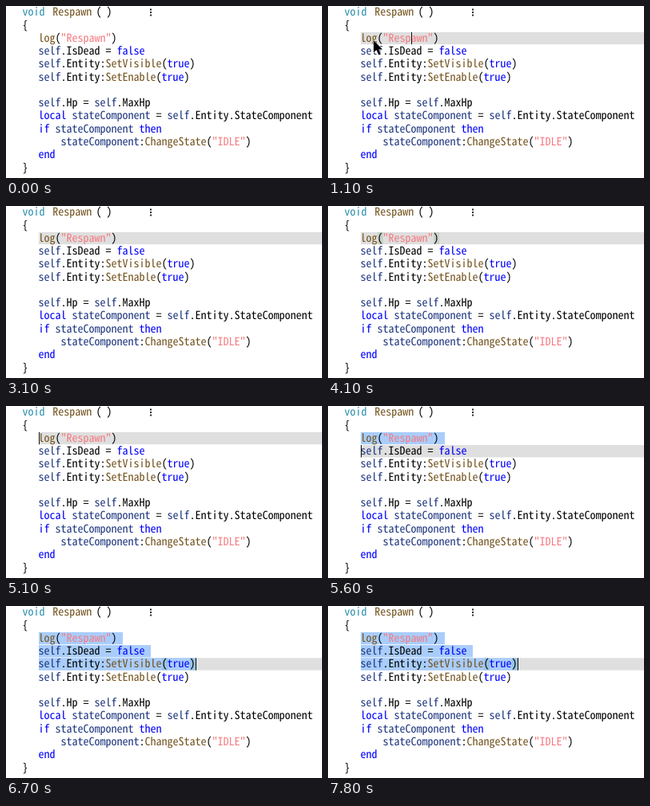
An HTML page that plays this animation: 395x216 px, repeating every 8000 ms.

```html
<!DOCTYPE html>
<html lang="en">
<head>
<meta charset="utf-8">
<title>Code editor</title>
<style>
  html, body { margin: 0; width: 100%; height: 100%; overflow: hidden; background: #fff; }
  svg { display: block; width: 395px; height: 216px; }
  text { white-space: pre; fill: #000; font-variant-ligatures: none; text-rendering: geometricPrecision; }
  .type { fill: #2b91af; }
  .func { fill: #74531f; }
  .word { fill: #0000ff; }
  .name { fill: #1f377f; }
  .str { fill: #f47c82; }
  .bold { font-weight: 700; font-size: 1.07em; }
  .hint path { fill: #fffecb; stroke: #d8d7b4; filter: drop-shadow(1px 1.5px 1px rgba(0, 0, 0, .45)); }
</style>
</head>
<body>
<svg id="stage" viewBox="0 0 395 216"></svg>
<script>
const LOOP = 8000, CELL = 7, LEFT = 41, TOP = 32.8, ROW = 16.25, BAR = 15.4;
const FONT = '"Noto Sans Mono CJK KR", "Noto Sans Mono CJK JP", "Noto Sans Mono", "DejaVu Sans Mono", monospace';
const stage = document.getElementById('stage');

function add(tag, attrs, parent = stage) {
  const node = document.createElementNS('http://www.w3.org/2000/svg', tag);
  for (const key in attrs) node.setAttribute(key, attrs[key]);
  parent.appendChild(node);
  return node;
}

const colX = col => LEFT + col * CELL;
const rowY = row => TOP + row * ROW;
const show = (node, on) => node.setAttribute('visibility', on ? 'visible' : 'hidden');

// One character fills one cell, whichever monospace face is found.
const pen = document.createElement('canvas').getContext('2d');
pen.font = '100px ' + FONT;
stage.style.fontFamily = FONT;
stage.style.fontSize = CELL * 100 / pen.measureText('0').width + 'px';

function cells(row, from, to, fill, parent) {
  return add('rect', { x: colX(from), y: rowY(row), width: (to - from) * CELL, height: BAR, fill }, parent);
}

// Parts are written as "class|text"; a plain part has no class.
function line(x, y, parts, parent) {
  const text = add('text', { x: x - 0.5, y }, parent);
  for (const part of parts) {
    const cut = part.indexOf('|');
    const span = add('tspan', cut > 0 ? { class: part.slice(0, cut) } : {}, text);
    span.textContent = part.slice(cut + 1);
  }
}

// Backgrounds
const activeLine = add('rect', { x: LEFT, width: 395 - LEFT, height: BAR, fill: '#dfdfdf' });
const SELECT = '#a9cdfb';
const selected = [
  cells(0, 0, 15, SELECT),
  cells(1, 0, 20, SELECT),
  cells(2, 0, 28, SELECT)
];
const matches = add('g', {});
[[1, 0], [2, 0], [3, 0], [5, 0], [5, 10], [6, 23]].forEach(([row, col]) =>
  cells(row, col, col + 4, 'rgba(250,160,80,.3)', matches));
const brackets = [[0, 3, 13], [2, 22, 27]].map(([row, open, close]) => {
  const group = add('g', {});
  for (const col of [open, close]) cells(row, col, col + 1, 'rgba(0,100,0,.1)', group);
  return group;
});

// Code
line(21, 12, ['type|void']);
line(58.8, 12, ['func|Respawn']);
line(113, 12, ['(']);
line(126, 12, [')']);
for (const y of [3.5, 7, 10.5]) add('rect', { x: 180, y, width: 2, height: 2, fill: '#222' });
line(21, 28.5, ['{']);
line(21, 208, ['}']);
[
  ['func|log', '(', 'str|"Respawn"', ')'],
  ['name|self', '.IsDead = ', 'word|false'],
  ['name|self', '.Entity:', 'func|SetVisible', '(', 'word|true', ')'],
  ['name|self', '.Entity:', 'func|SetEnable', '(', 'word|true', ')'],
  [],
  ['name|self', '.Hp = ', 'name|self', '.MaxHp'],
  ['word|local', 'name| stateComponent', ' = ', 'name|self', '.Entity.StateComponent'],
  ['word|if', 'name| stateComponent', 'word| then'],
  ['name|    stateComponent', ':', 'func|ChangeState', '(', 'str|"IDLE"', ')'],
  ['word|end']
].forEach((parts, row) => line(LEFT, rowY(row) + 12.1, parts));

const caret = add('rect', { width: 1, height: BAR, fill: '#111' });

// Hover hint with a tail that points at the word
const hint = add('g', { class: 'hint' });
add('path', {
  d: 'M36.5 1.5H216.5Q219.5 1.5 219.5 4.5V19.5Q219.5 22.5 216.5 22.5H52L47 27L42 22.5H36.5Q33.5 22.5 33.5 19.5V4.5Q33.5 1.5 36.5 1.5Z'
}, hint);
line(40.5, 16, ['(function) (function) ', 'bold|log'], hint);

const pointer = add('path', {
  d: 'M0 0V15.6L3.6 12.3L6.4 18.6L9 17.4L6.3 11.4H11Z',
  fill: '#000', stroke: '#fff', 'stroke-width': 1, 'paint-order': 'stroke'
});

// Each step keeps the earlier values it does not name.
const steps = [
  [0, { row: -1, caret: null, mouse: null, hint: 0, sel: 0, words: false, pair: -1 }],
  [300, { mouse: [243, 44] }],
  [400, { mouse: [165, 43] }],
  [500, { mouse: [105, 41] }],
  [700, { row: 0, caret: 9 }],
  [900, { mouse: [98, 42] }],
  [1000, { mouse: [76, 43] }],
  [1100, { mouse: [57, 43] }],
  [1200, { mouse: [51, 41], caret: null }],
  [1300, { mouse: [48, 39] }],
  [1500, { hint: 0.5 }],
  [1600, { hint: 1 }],
  [1700, { caret: 1 }],
  [1800, { hint: 0 }],
  [2000, { mouse: null, caret: null }],
  [2600, { caret: 1 }],
  [3100, { caret: null }],
  [3300, { caret: 0 }],
  [3400, { caret: 14, pair: 0 }],
  [4100, { caret: null }],
  [4600, { caret: 14 }],
  [5100, { caret: 0, pair: -1 }],
  [5600, { row: 1, sel: 1 }],
  [5900, { row: 2, sel: 2, words: true }],
  [6400, { caret: null }],
  [6700, { caret: 28, sel: 3, words: false, pair: 1 }],
  [7300, { caret: null }],
  [7800, { caret: 28 }]
];

function draw(time) {
  const now = {};
  for (const [at, change] of steps) if (at <= time) Object.assign(now, change);

  const y = rowY(now.row);
  show(activeLine, now.row >= 0);
  activeLine.setAttribute('y', y);
  show(caret, now.caret !== null);
  caret.setAttribute('x', colX(now.caret || 0));
  caret.setAttribute('y', y);
  selected.forEach((rect, i) => show(rect, i < now.sel));
  brackets.forEach((group, i) => show(group, i === now.pair));
  show(matches, now.words);
  hint.setAttribute('opacity', now.hint);
  show(pointer, now.mouse);
  if (now.mouse) pointer.setAttribute('transform', `translate(${now.mouse})`);
}

const start = performance.now();
function tick() {
  draw((performance.now() - start) % LOOP);
  requestAnimationFrame(tick);
}
tick();
</script>
</body>
</html>
```
